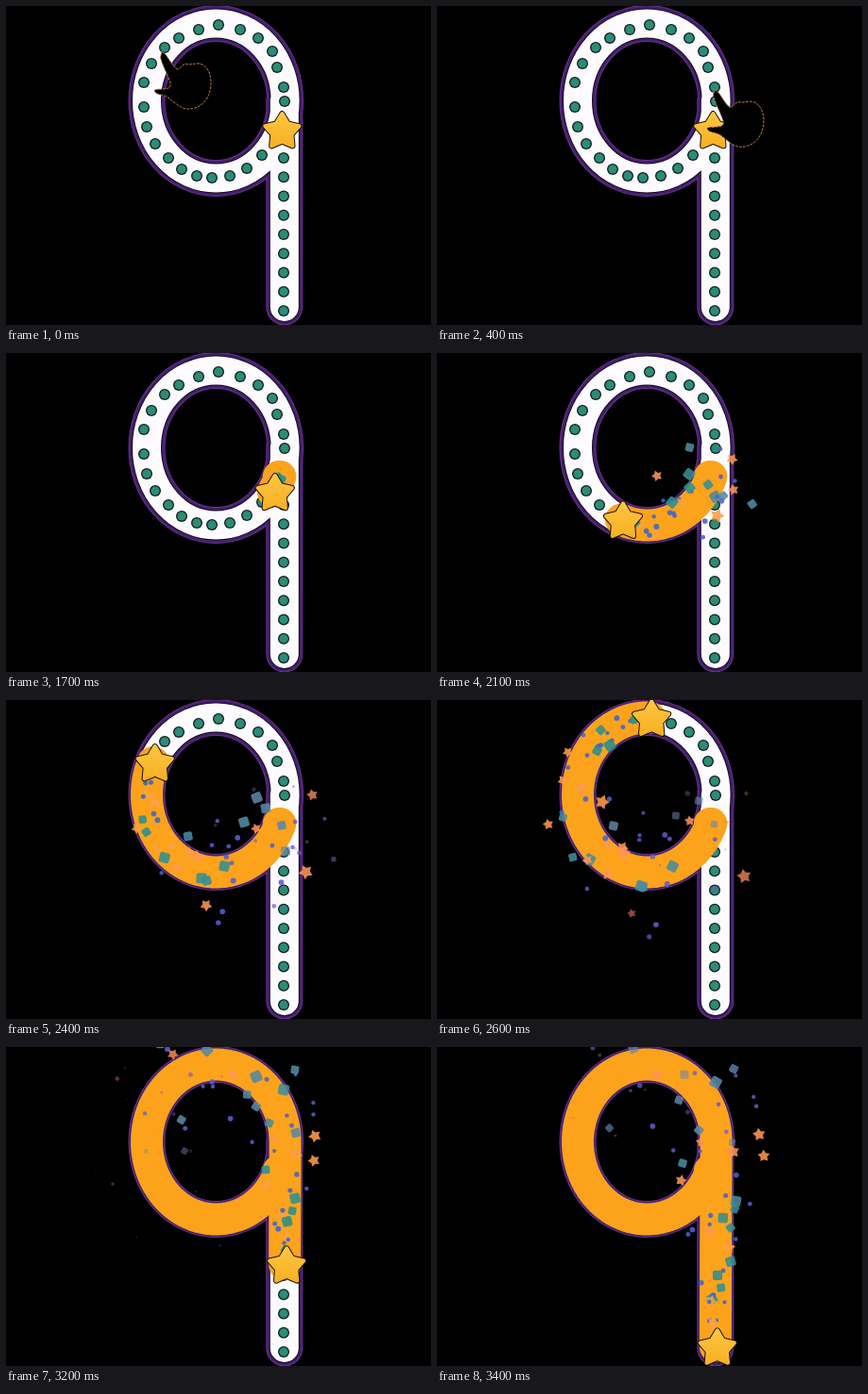
Recreate the animation shown at these times as an HTML page with a canvas. Size 450 by 338 pixels, loop 3.5 s.

```html
<!DOCTYPE html>
<html lang="en">
<head>
<meta charset="utf-8">
<title>Trace the nine</title>
<style>
html, body { margin: 0; width: 100%; height: 100%; overflow: hidden; background: #000; }
canvas { display: block; width: 450px; height: 338px; }
</style>
</head>
<body>
<canvas id="stage" width="450" height="338"></canvas>
<script>
const ctx = document.getElementById('stage').getContext('2d');
const LOOP = 3500, STEP = 100, TAU = Math.PI * 2;
const RING = { x: 222.3, y: 100.5, rx: 73.3, ry: 82 };
const STEM = { x: 294.8, end: 319 };
const START_ANGLE = 0.381;

// Loop dots clockwise from the top right end
const DOTS = [
  [295, 101], [294, 86], [287, 65], [282, 48], [267, 34], [248, 25], [225, 20],
  [204, 25], [183, 34], [168, 44], [154, 61], [146, 81], [146, 107], [149, 128],
  [158, 146], [172, 161], [186, 173], [202, 180], [218, 182], [237, 180], [255, 172], [271, 158]
];
for (let i = 0; i < 9; i++) DOTS.push([294, 161 + i * 20.25]);

// Hand outline relative to the fingertip
const HAND = [
  [-3, 0], [3, 1], [10, 12], [17, 21], [23, 13], [31, 14], [40, 12], [49, 18], [53, 31],
  [50, 48], [40, 59], [25, 62], [14, 55], [5, 47], [-6, 45], [-9, 40], [2, 40], [11, 38], [6, 25], [0, 12]
];

// Writing path with cumulative lengths
const route = [];
function addPoint(x, y) {
  const p = route[route.length - 1];
  route.push({ x, y, d: p ? p.d + Math.hypot(x - p.x, y - p.y) : 0 });
}
for (let i = 0; i <= 300; i++) {
  const a = START_ANGLE + (TAU - START_ANGLE) * i / 300;
  addPoint(RING.x + RING.rx * Math.cos(a), RING.y + RING.ry * Math.sin(a));
}
addPoint(STEM.x, STEM.end);

function pointAt(d) {
  let i = 1;
  while (i < route.length - 1 && route[i].d < d) i++;
  const a = route[i - 1], b = route[i];
  const k = Math.max(0, Math.min(1, (d - a.d) / (b.d - a.d)));
  return { x: a.x + (b.x - a.x) * k, y: a.y + (b.y - a.y) * k };
}

const KEYS = [[2200, 158.6], [2600, 338], [3200, 587], [3400, 674]];
function starDistance(t) {
  if (t < 1450) return 0;
  if (t < 2200) return 0.000282 * (t - 1450) ** 2;
  for (let i = 1; i < KEYS.length; i++) {
    const [t0, d0] = KEYS[i - 1], [t1, d1] = KEYS[i];
    if (t <= t1) return d0 + (d1 - d0) * (t - t0) / (t1 - t0);
  }
  return 674;
}

function seeded(seed) {
  return () => {
    seed = (seed * 1664525 + 1013904223) % 4294967296;
    return seed / 4294967296;
  };
}

const rnd = seeded(97);
const COLORS = {
  star: [[255, 164, 56], [255, 132, 118]],
  square: [[28, 146, 134], [138, 128, 190]],
  dot: [[48, 104, 205], [140, 80, 200]]
};
const confetti = Array.from({ length: 130 }, (_, i) => {
  const born = 1640 + i * 14;
  const from = pointAt(Math.max(0, starDistance(born) - 12));
  const pick = rnd();
  return {
    born, from,
    kind: pick < 0.28 ? 'star' : pick < 0.6 ? 'square' : 'dot',
    angle: rnd() * TAU,
    reach: 18 + 60 * rnd(),
    life: 800 + 350 * rnd(),
    turn: rnd() * TAU,
    size: 0.8 + 0.35 * rnd()
  };
});

function starPath(x, y, r, turn) {
  ctx.beginPath();
  for (let i = 0; i < 10; i++) {
    const a = turn - Math.PI / 2 + i * Math.PI / 5;
    const q = i % 2 ? r * 0.56 : r;
    ctx.lineTo(x + q * Math.cos(a), y + q * Math.sin(a));
  }
  ctx.closePath();
}

function disc(x, y, r, color) {
  ctx.beginPath();
  ctx.arc(x, y, r, 0, TAU);
  ctx.fillStyle = color;
  ctx.fill();
}

function strokeNine(width, color) {
  ctx.lineWidth = width;
  ctx.strokeStyle = color;
  ctx.beginPath();
  ctx.ellipse(RING.x, RING.y, RING.rx, RING.ry, 0, 0, TAU);
  ctx.moveTo(STEM.x, RING.y);
  ctx.lineTo(STEM.x, STEM.end);
  ctx.stroke();
}

function drawNine() {
  strokeNine(39, '#6d318c');
  strokeNine(37, '#42206e');
  strokeNine(32, '#120a1c');
  strokeNine(30, '#fdfbfe');
  for (const [x, y] of DOTS) {
    disc(x, y, 6, '#101c1c');
    disc(x, y, 4.7, '#2b8c78');
  }
}

function drawTrail(d) {
  const tip = pointAt(d);
  ctx.beginPath();
  ctx.moveTo(route[0].x - 1.5, route[0].y);
  for (const p of route) {
    if (p.d >= d) break;
    ctx.lineTo(p.x, p.y);
  }
  ctx.lineTo(tip.x, tip.y);
  ctx.lineWidth = 34;
  ctx.strokeStyle = '#fca31b';
  ctx.stroke();
}

function drawConfetti(t) {
  for (const c of confetti) {
    const u = (t - c.born) / c.life;
    if (u < 0 || u >= 1) continue;
    const far = c.reach * (1 - (1 - u) ** 2.4);
    const x = c.from.x + far * Math.cos(c.angle);
    const y = c.from.y + far * Math.sin(c.angle) + 6 * u * u;
    const size = c.size * Math.min(1, (1 - u) * 3);
    const turn = c.turn + u * 1.6;
    const [a, b] = COLORS[c.kind];
    const rgb = a.map((v, i) => Math.round(v + (b[i] - v) * u));
    ctx.globalAlpha = 0.88 * Math.min(1, (1 - u) * 2.5);
    ctx.fillStyle = `rgb(${rgb})`;
    if (c.kind === 'star') {
      starPath(x, y, 7 * size, turn);
      ctx.fill();
    } else if (c.kind === 'square') {
      ctx.save();
      ctx.translate(x, y);
      ctx.rotate(turn);
      ctx.beginPath();
      ctx.roundRect(-5 * size, -5 * size, 10 * size, 10 * size, 2 * size);
      ctx.fill();
      ctx.restore();
    } else {
      disc(x, y, 2.6 * size, ctx.fillStyle);
    }
  }
  ctx.globalAlpha = 1;
}

function drawStar(d) {
  const p = pointAt(d), x = p.x + 2, y = p.y + 2;
  const fill = ctx.createLinearGradient(0, y - 20, 0, y + 20);
  fill.addColorStop(0, '#fdc63f');
  fill.addColorStop(1, '#f7ae22');
  starPath(x, y, 19, 0);
  ctx.lineWidth = 6;
  ctx.strokeStyle = '#181008';
  ctx.stroke();
  ctx.lineWidth = 4;
  ctx.strokeStyle = ctx.fillStyle = fill;
  ctx.stroke();
  ctx.fill();
}

function drawHand(t) {
  if (t >= 1200) return;
  const tip = pointAt(Math.min(674, 269 + 0.44 * t));
  ctx.save();
  ctx.globalAlpha = Math.min(1, (1200 - t) / 200);
  ctx.translate(tip.x - 1, tip.y);
  ctx.beginPath();
  HAND.forEach(([x, y], i) => {
    const [nx, ny] = HAND[(i + 1) % HAND.length];
    const mx = (x + nx) / 2, my = (y + ny) / 2;
    if (i) ctx.quadraticCurveTo(x, y, mx, my);
    else ctx.moveTo(mx, my);
  });
  ctx.closePath();
  ctx.fillStyle = '#000';
  ctx.fill();
  ctx.setLineDash([2, 2]);
  ctx.lineWidth = 1;
  ctx.strokeStyle = '#c98a55';
  ctx.stroke();
  ctx.restore();
}

function draw(t) {
  ctx.fillStyle = '#000';
  ctx.fillRect(0, 0, 450, 338);
  ctx.lineCap = ctx.lineJoin = 'round';
  const d = starDistance(t);
  drawNine();
  if (d > 0) drawTrail(d);
  drawConfetti(t);
  drawStar(d);
  drawHand(t);
}

const begin = performance.now();
function tick() {
  const t = (performance.now() - begin) % LOOP;
  draw(Math.floor(t / STEP) * STEP);
  requestAnimationFrame(tick);
}
tick();
</script>
</body>
</html>
```
